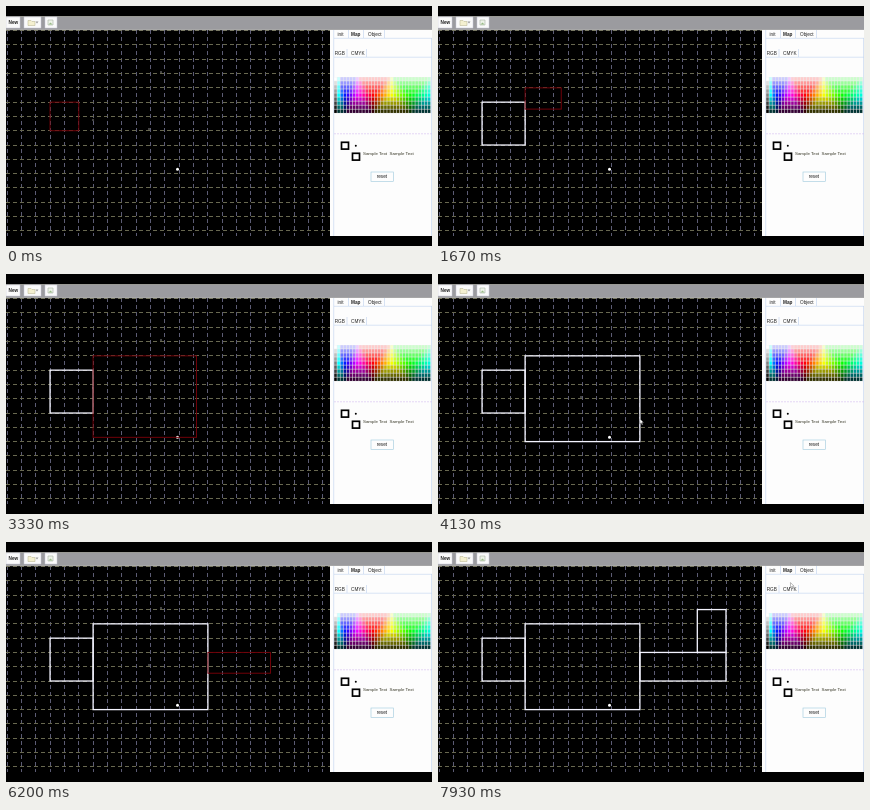
An HTML page for the animation above (8000 ms loop, 426x240 px).

```html
<!DOCTYPE html>
<html lang="en">
<meta charset="utf-8">
<title>Map editor</title>
<style>
  html, body { margin: 0; width: 100%; height: 100%; overflow: hidden; background: #000; }
  svg { display: block; width: 100vw; height: 100vh; }
  text { font: 4.7px Arial, "Liberation Sans", sans-serif; fill: #222; }
  .bold { font-weight: bold; }
  .small { font-size: 4.4px; fill: #332; white-space: pre; }
</style>
<svg id="stage" viewBox="0 0 426 240">
  <rect width="426" height="240"/>
  <rect y="10.5" width="426" height="13" fill="#9b9b9f"/>
  <path d="M0 10.5H426" stroke="#bcbcb4" stroke-width=".7"/>
  <path d="M0 11H14V22H0ZM18 11H35V22H18ZM39 11H51V22H39Z" fill="#fafafa" stroke="#c8c8d8" stroke-width=".5"/>
  <text x="2.5" y="18.3" class="bold">New</text>
  <path d="M22 14.5h3l1 1h3v4h-7Z" fill="#f4f0d0" stroke="#b5b08a" stroke-width=".5"/>
  <path d="M29.5 15.5h3l-1.5 2Z" fill="#999"/>
  <path d="M42 14h5v5h-5Z" fill="#edf3e8" stroke="#a8b4a4" stroke-width=".6"/>
  <path d="M42.5 18.5l2-2 2 2Z" fill="#9abb88"/>

  <g id="grid" stroke-dasharray="4 3" shape-rendering="crispEdges"></g>
  <path d="M155 66h.01M143 123h.01M87 114h.01" stroke="#aaa" stroke-width="1.5" stroke-linecap="round"/>
  <circle cx="171.5" cy="163.3" r="1.5" fill="#fff"/>
  <path d="M0 23.7H324" stroke="#d8d8d8" stroke-width=".8"/>
  <g id="shapes" fill="none"></g>

  <rect x="324" y="23.5" width="102" height="206.5" fill="#fdfdfd"/>
  <g fill="none" stroke="#bfd2ee" stroke-width=".6">
    <path d="M328 32.3H426M328 51.2H426M342.5 24V32M357.5 24V32M378.5 24V32M341 43V51M360.5 43V51M327.7 24V230M425.5 32V230"/>
    <path d="M328 127.8H426" stroke="#d2b9ec" stroke-dasharray="2 1"/>
    <rect x="365" y="166" width="22.5" height="9.3" stroke="#9dc9dc"/>
  </g>
  <text x="331.5" y="30">init</text>
  <text x="345" y="30" class="bold">Map</text>
  <text x="362" y="30">Object</text>
  <text x="328.7" y="48.8">RGB</text>
  <text x="345" y="48.8">CMYK</text>
  <g id="swatches"></g>
  <g fill="#fff" stroke="#000" stroke-width="1.7">
    <rect x="335.5" y="136.3" width="7" height="6.8"/>
    <rect x="346.5" y="147.3" width="7" height="6.8"/>
  </g>
  <circle cx="349.8" cy="139.8" r="1"/>
  <text x="357" y="149.2" class="small">Sample Text  Sample Text</text>
  <text x="370.7" y="172.3">reset</text>
  <path id="cursor" d="M0 0v5l1.2-1 .9 2 .8-.4-.9-1.9h1.6Z" fill="#fff" stroke="#555" stroke-width=".4"/>
</svg>
<script>
const LOOP = 8000, FRAME = 1000 / 15;
const byId = id => document.getElementById(id);
const gridX = col => 1 + 14.35 * col;
const gridY = row => 24.7 + 14.29 * row;
const clamp = (value, low, high) => Math.max(low, Math.min(high, value));
const mix = (a, b, p) => a + (b - a) * p;

function set(node, attributes) {
  for (const name in attributes) node.setAttribute(name, attributes[name]);
}
function add(parent, tag, attributes = {}) {
  const node = document.createElementNS("http://www.w3.org/2000/svg", tag);
  set(node, attributes);
  byId(parent).append(node);
  return node;
}

for (let col = 0; col < 23; col++)
  add("grid", "path", { d: `M${gridX(col)} 24V230`, stroke: "#5c5c74" });
for (let row = 0; row < 15; row++)
  add("grid", "path", { d: `M0 ${gridY(row)}H324`, stroke: "#686850" });

// A hue wheel from cyan to cyan, clamped to a light floor above and a dark ceiling below.
function swatchColor(col, row) {
  if (!col) return Array(3).fill(255 - 32 * row);
  const hue = 3 + 6 * ((col - 1) / 30) ** .7;
  const floor = Math.max(0, 204 - 51 * row), ceiling = Math.min(255, 459 - 51 * row);
  return [0, 2, 4].map(peak => {
    const distance = Math.abs((hue - peak + 9) % 6 - 3);
    return clamp(255 * (2 - distance), floor, ceiling);
  });
}
add("swatches", "rect", { x: 328, y: 71, width: 97, height: 36.5, fill: "#eee" });
for (let row = 0; row < 9; row++)
  for (let col = 0; col < 31; col++)
    add("swatches", "rect", {
      x: 328.2 + 3.12 * col, y: 71.2 + 4.03 * row, width: 2.6, height: 3.5,
      fill: `rgb(${swatchColor(col, row)})`
    });

// Each drag is a path of [time, column, row]; its two ends span the finished box.
const drags = [
  [[-700, 3, 5], [350, 6, 8]],
  [[1200, 6, 4], [2330, 12.1, 7.6], [3330, 13.2, 9.7], [3900, 14, 10]],
  [[5400, 14, 6], [6500, 20, 8]],
  [[6900, 18, 3], [7450, 20, 6]]
];
const rest = [8000, 24.5, 1.1];
const boxes = drags.map(() => add("shapes", "rect"));

function sample(path, t) {
  const next = Math.max(1, path.findIndex(([time]) => time > t));
  const a = path[next - 1], b = path[next], p = clamp((t - a[0]) / (b[0] - a[0]), 0, 1);
  return [mix(a[1], b[1], p), mix(a[2], b[2], p)];
}

function draw(now) {
  const t = Math.floor(now % LOOP / FRAME + .1) * FRAME;
  let pointer = null;
  drags.forEach((path, i) => {
    const first = path[0], last = path.at(-1), done = t >= last[0];
    const [right, bottom] = done ? last.slice(1) : sample(path, t);
    const x = gridX(first[1]), y = gridY(first[2]);
    set(boxes[i], {
      x, y, width: gridX(right) - x, height: gridY(bottom) - y,
      stroke: done ? "#f4f4ff" : "#700008", "stroke-width": done ? 1.3 : 1,
      visibility: t >= first[0] ? "visible" : "hidden"
    });
    // Between drags the pointer glides to the next starting corner.
    const goal = drags[i + 1]?.[0] ?? rest;
    if (done && t < goal[0]) {
      const p = 1 - (1 - (t - last[0]) / (goal[0] - last[0])) ** 3;
      pointer = [gridX(mix(last[1], goal[1], p)), gridY(mix(last[2], goal[2], p))];
    }
  });
  set(byId("cursor"), {
    visibility: pointer ? "visible" : "hidden",
    transform: `translate(${pointer ?? [0, 0]})`
  });
}

const begin = performance.now();
function tick() {
  draw(performance.now() - begin);
  requestAnimationFrame(tick);
}
tick();
</script>
</html>
```
